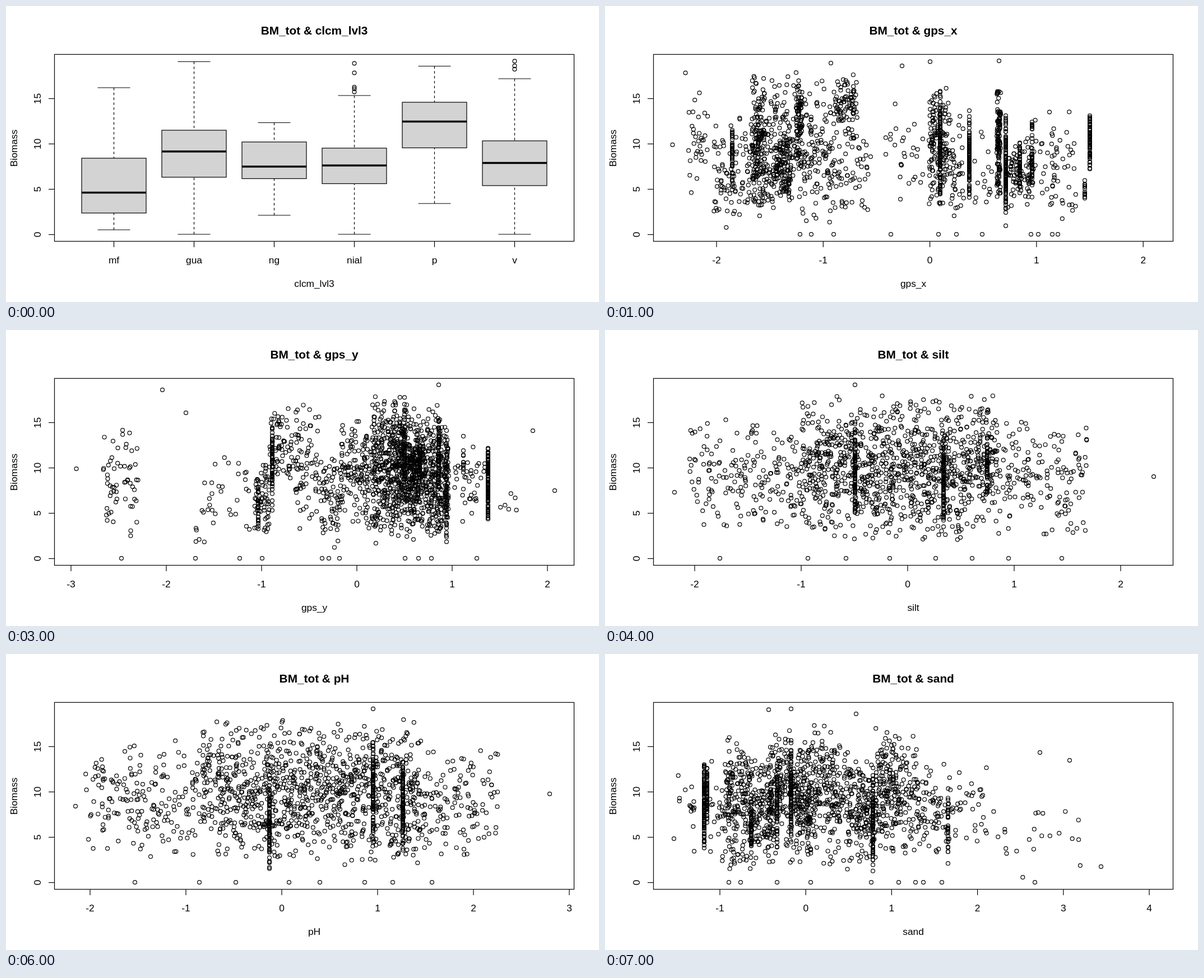
Write an HTML page with a canvas that moves like this. It is 1058 by 529 pixels and loops after 8 s.

```html
<!DOCTYPE html>
<html lang="en">
<head>
<meta charset="utf-8">
<title>Biomass plots</title>
<style>
html, body { margin: 0; width: 100%; height: 100%; overflow: hidden; background: #fff; }
canvas { display: block; }
</style>
</head>
<body>
<canvas id="stage" width="1058" height="529"></canvas>
<script>
const ctx = document.getElementById('stage').getContext('2d');
const FONT = '"Liberation Sans", Arial, sans-serif';
const SLIDE_MS = 1000, ZERO_Y = 408, UNIT_Y = 16.19, CENTER_X = 550;
const slides = [];

function randomizer(seed) {
  return () => {
    seed = (seed + 0x6D2B79F5) | 0;
    let t = Math.imul(seed ^ (seed >>> 15), 1 | seed);
    t = (t + Math.imul(t ^ (t >>> 7), 61 | t)) ^ t;
    return ((t ^ (t >>> 14)) >>> 0) / 4294967296;
  };
}

function line(x1, y1, x2, y2) {
  ctx.beginPath();
  ctx.moveTo(x1, y1);
  ctx.lineTo(x2, y2);
  ctx.stroke();
}

function circle(x, y) {
  ctx.beginPath();
  ctx.arc(x, y, 3.4, 0, 7);
  ctx.stroke();
}

function text(label, x, y, font = '17.33px ') {
  ctx.font = font + FONT;
  ctx.fillText(label, x, y);
}

function upright(label, x, y) {
  ctx.save();
  ctx.translate(x, y);
  ctx.rotate(-Math.PI / 2);
  text(label, 0, 0);
  ctx.restore();
}

function drawFrame(name, ticks) {
  ctx.fillStyle = '#fff';
  ctx.fillRect(0, 0, 1058, 529);
  ctx.fillStyle = ctx.strokeStyle = '#000';
  ctx.lineWidth = 1.2;
  ctx.textAlign = 'center';
  ctx.strokeRect(86.5, 86.5, 927, 334);
  text('BM_tot & ' + name, CENTER_X, 51, 'bold 20.8px ');
  text(name, CENTER_X, 502);
  upright('Biomass', 19.5, 254);
  for (let v = 0; v <= 15; v += 5) {
    const y = Math.round(ZERO_Y - v * UNIT_Y) + 0.5;
    line(76, y, 86.5, y);
    upright(v, 61.5, y);
  }
  for (const [x, label] of ticks) {
    line(x, 420.5, x, 431);
    text(label, x, 459.5);
  }
}

// Each box: label, upper whisker, q3, median, q1, lower whisker, outliers
function boxplot(name, ...boxes) {
  const centre = i => 192.5 + 143 * i;
  slides.push(() => {
    drawFrame(name, boxes.map((b, i) => [centre(i), b[0]]));
    boxes.forEach(([, top, q3, median, q1, bottom, ...outliers], i) => {
      const x = centre(i);
      ctx.setLineDash([4.4, 4.4]);
      line(x, top, x, q3);
      line(x, bottom, x, q1);
      ctx.setLineDash([]);
      line(x - 29, top, x + 29, top);
      line(x - 29, bottom, x + 29, bottom);
      ctx.fillStyle = '#d3d3d3';
      ctx.fillRect(x - 57.5, q3, 115, q1 - q3);
      ctx.strokeRect(x - 57.5, q3, 115, q1 - q3);
      ctx.lineWidth = 3.4;
      line(x - 57.5, median, x + 57.5, median);
      ctx.lineWidth = 1.2;
      ctx.fillStyle = '#000';
      outliers.forEach(y => circle(x, y));
    });
  });
}

// axis: first tick x, spacing, first and last value
// clouds: left, right, top, bottom, count; stripes: x, top, bottom, count
function scatter(name, [x0, step, first, last], { clouds, stripes, singles, zeros }) {
  const random = randomizer(name.length * 97 + x0);
  const points = [...singles, ...zeros.map(x => [x, ZERO_Y])];
  const ticks = [];
  for (let v = first; v <= last; v++) ticks.push([x0 + (v - first) * step, v]);
  const fill = (left, right, top, bottom, n) => {
    while (n--) {
      const x = left + (right - left) * random();
      points.push([x, top + (bottom - top) * (random() + random()) / 2]);
    }
  };
  clouds.forEach(c => fill(...c));
  stripes.forEach(([x, ...rest]) => fill(x, x, ...rest));
  slides.push(() => {
    drawFrame(name, ticks);
    points.forEach(p => circle(...p));
  });
}

boxplot('clcm_lvl3',
  ['mf', 146, 272, 333.5, 370, 400],
  ['gua', 99.5, 222, 260, 306, 408],
  ['ng', 208.5, 243, 287, 308.5, 374],
  ['nial', 160, 254, 285, 317.5, 408, 102.5, 119.5, 145, 148, 153.5],
  ['p', 107.5, 172, 206.5, 253.5, 353],
  ['v', 130, 241, 280.5, 321, 408, 98.5, 107, 113]);

scatter('gps_x', [199, 190.3, -2, 2], {
  clouds: [
    [149, 185, 140, 350, 32], [194, 262, 190, 400, 90], [262, 285, 115, 390, 180],
    [285, 340, 115, 385, 130], [301, 332, 235, 350, 110], [341, 352, 115, 300, 88],
    [345, 405, 130, 400, 120], [408, 450, 115, 250, 95], [400, 475, 210, 380, 65],
    [500, 570, 165, 350, 28], [578, 614, 140, 365, 150], [614, 640, 175, 390, 42],
    [655, 690, 220, 390, 16], [699, 706, 125, 360, 125], [718, 765, 225, 370, 85],
    [765, 840, 180, 400, 58]
  ],
  stripes: [
    [227, 207, 335, 42], [598, 140, 370, 100], [650, 185, 355, 88], [715, 190, 396, 120],
    [740, 235, 345, 52], [762, 188, 340, 38], [856, 305, 350, 14], [865, 185, 298, 65]
  ],
  singles: [[120.5, 248], [143.5, 119.5], [403, 102], [530, 107], [580, 99.5], [703, 98]],
  zeros: [348, 368, 408, 510, 595, 627, 673, 760, 773, 798, 808]
});

scatter('CaCO3', [139, 173.3, -1, 4], {
  clouds: [
    [120, 145, 120, 350, 290], [145, 170, 115, 360, 155], [170, 198, 125, 360, 190],
    [199, 270, 145, 375, 235], [120, 270, 330, 395, 32], [282, 318, 150, 355, 155],
    [318, 326, 195, 390, 42], [330, 390, 160, 360, 46], [390, 475, 230, 400, 45],
    [490, 545, 180, 375, 42], [560, 630, 150, 365, 22], [650, 660, 180, 350, 32],
    [660, 760, 200, 390, 16], [785, 850, 215, 350, 14]
  ],
  stripes: [
    [437, 150, 340, 70], [442, 180, 355, 110], [478, 240, 348, 65], [569, 170, 340, 18],
    [645, 188, 320, 50], [763, 135, 357, 32], [803, 195, 396, 88], [193, 230, 290, 40]
  ],
  singles: [
    [161, 99], [367, 107], [437, 98], [506, 135], [872, 322], [907, 269], [909, 349],
    [951, 308], [979, 279]
  ],
  zeros: [120, 169, 211, 256, 327, 347, 373, 405, 435, 786, 800, 958]
});

scatter('gps_y', [116, 170, -3, 2], {
  clouds: [
    [173, 236, 160, 385, 58], [335, 370, 260, 395, 13], [365, 435, 200, 360, 22],
    [440, 470, 230, 365, 58], [470, 530, 120, 310, 85], [515, 560, 120, 370, 55],
    [562, 598, 190, 395, 68], [598, 650, 150, 360, 130], [652, 690, 112, 380, 235],
    [690, 716, 113, 360, 245], [716, 745, 140, 365, 260], [745, 778, 130, 380, 225],
    [782, 790, 165, 380, 70], [640, 780, 300, 390, 38], [795, 855, 180, 350, 34],
    [870, 920, 270, 350, 6]
  ],
  stripes: [
    [475, 165, 325, 55], [450, 250, 360, 25], [711, 110, 300, 35], [738, 200, 270, 45],
    [772, 140, 310, 45], [786, 170, 396, 45], [816, 180, 300, 12], [860, 185, 353, 125]
  ],
  singles: [[125.5, 248], [279, 107], [321, 148], [772, 98], [940, 180], [979, 287]],
  zeros: [206, 338, 417, 457, 564, 576, 595, 712, 736, 759, 840]
});

scatter('silt', [160, 190, -2, 2], {
  clouds: [
    [150, 350, 150, 370, 180], [350, 700, 110, 380, 1050], [700, 860, 150, 380, 150]
  ],
  stripes: [[446, 150, 350, 80], [604, 185, 353, 110], [682, 185, 298, 60]],
  singles: [[124, 290], [979, 262], [446, 98]],
  zeros: [205, 362, 430, 508, 590, 655, 720, 815]
});

scatter('CEC', [98, 180.3, -2, 3], {
  clouds: [
    [168, 195, 140, 370, 72], [195, 225, 110, 350, 225], [225, 250, 140, 365, 160],
    [225, 290, 130, 385, 120], [290, 355, 180, 385, 125], [310, 395, 145, 390, 105],
    [395, 430, 180, 340, 75], [435, 455, 150, 365, 145], [455, 480, 145, 350, 85],
    [480, 570, 160, 390, 105], [534, 542, 190, 345, 25], [570, 636, 180, 380, 52],
    [637, 664, 200, 365, 68], [664, 682, 145, 390, 78], [735, 816, 180, 370, 44]
  ],
  stripes: [
    [427, 190, 300, 85], [447, 200, 355, 90], [640, 200, 395, 70], [672, 135, 345, 28],
    [702, 185, 325, 60], [731, 150, 350, 95], [352, 270, 370, 20]
  ],
  singles: [
    [121, 380], [195, 107], [230, 102], [346, 99.5], [376, 106.5], [576, 113], [731, 98]
  ],
  zeros: [247, 322, 407, 417, 471, 485, 531, 573, 584, 619, 731]
});

scatter('pH', [150, 171, -2, 3], {
  clouds: [
    [140, 350, 150, 370, 180], [350, 740, 110, 380, 1050], [740, 880, 150, 380, 130]
  ],
  stripes: [[470, 195, 395, 75], [655, 150, 350, 85], [708, 185, 353, 110]],
  singles: [[124, 272], [970, 250], [655, 98]],
  zeros: [230, 345, 410, 505, 560, 640, 690, 760]
});

scatter('sand', [205, 153.2, -1, 4], {
  clouds: [
    [130, 160, 200, 370, 15], [186, 215, 150, 390, 22], [214, 256, 140, 390, 165],
    [256, 300, 170, 375, 155], [292, 330, 130, 355, 130], [330, 370, 150, 365, 180],
    [360, 410, 120, 370, 155], [405, 440, 150, 350, 75], [435, 483, 180, 375, 150],
    [483, 525, 130, 365, 170], [525, 560, 120, 360, 80], [560, 615, 190, 390, 68],
    [612, 685, 190, 350, 36], [200, 500, 340, 395, 33], [685, 850, 260, 400, 22]
  ],
  stripes: [
    [177, 185, 353, 125], [182, 190, 320, 60], [261, 240, 370, 45], [307, 190, 350, 55],
    [332, 150, 340, 80], [478, 190, 396, 75], [612, 220, 390, 28]
  ],
  singles: [
    [123, 330], [292, 99.5], [332, 98], [448, 107], [776, 176], [829, 190], [885, 380]
  ],
  zeros: [221, 242, 307, 367, 475, 524, 554, 568, 601, 767]
});

const start = performance.now();
let shown = -1;

function tick() {
  const index = Math.floor((performance.now() - start) / SLIDE_MS) % slides.length;
  if (index !== shown) slides[shown = index]();
  requestAnimationFrame(tick);
}
tick();
</script>
</body>
</html>
```
